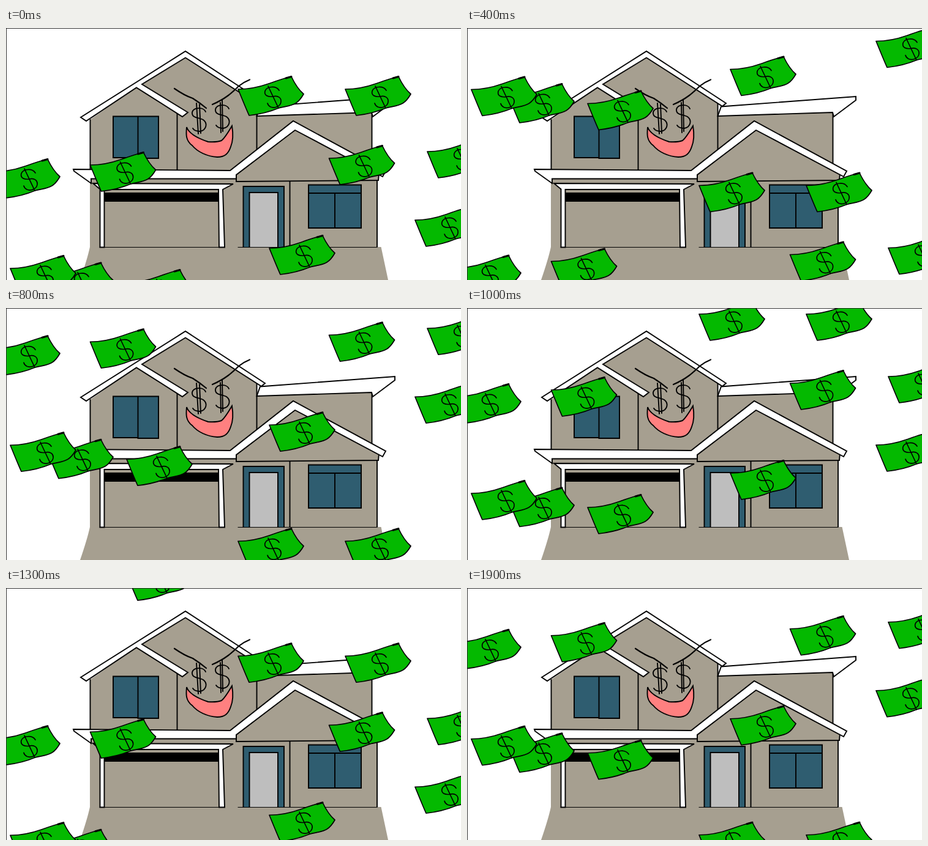
Write an HTML page that moves like this. It is 743x412 px and loops after 2000 ms.

```html
<!DOCTYPE html>
<html lang="en">
<head>
<meta charset="utf-8">
<title>Money house</title>
<style>
  html, body { margin: 0; width: 100%; height: 100%; overflow: hidden; background: #fff; }
  svg { display: block; width: 743px; height: 412px; }
  .line { fill: none; }
  .wall { fill: #a69f90; }
  .roof { fill: #fff; }
  .glass { fill: #2f5d70; }
</style>
</head>
<body>
<svg viewBox="0 0 743 412" stroke="#000" stroke-width="1.9" stroke-linecap="round">
  <defs>
    <g id="bill" stroke-width="1.7" stroke-linejoin="round">
      <path fill="#04b900" d="M0 22C20 22 36 18 50 13C64 8 75 4 87 1.500C92 12 99 23 107 30C103 37 99 42 94 45C86 50 76 50 66 53C52 59 36 63 18 65C13 54 7 39 0 22Z"/>
      <path class="line" stroke-width="3" d="M78 4L87 1.500"/>
      <path class="line" d="M67 24C62 16 47 17 44 25C42 33 50 35 57 34C65 32 71 36 70 43C69 50 60 54 53 51Q49 49 48 45M49 17L66 53"/>
    </g>
  </defs>

  <!-- walls -->
  <g class="wall" stroke="none">
    <path d="M137 358H612.500L624 412H121Q133 377 137 358Z"/>
    <path d="M137 246H606V359H137Z"/>
    <path d="M137 150L213 97L293 46L409 124V246H137Z"/>
    <path d="M409 144L597 138V246H409Z"/>
  </g>
  <path class="line" d="M137.500 150V232M279.500 140V232M409.500 124V198M597.500 138V226M463.500 251V358M606 249V358"/>
  <path class="line" stroke-width="1.2" d="M153 358.500H356M379 358.500H605"/>

  <!-- roofs -->
  <path class="roof" d="M409.500 144L415 128.500L635 112V118L599 145L597 138Z"/>
  <path class="roof" d="M122 146L293 38L423 123L417 128L293 48.500L222 92L297 138L288 145L213 97.500L131 152Z"/>
  <path class="wall" d="M376 240L472 166L609 238L608 249L376 251Z"/>
  <path class="roof" d="M110 231L366 233L469 152L620 234L615 243L472 167L376 240V246.500H139V254L111 234Z"/>

  <!-- garage -->
  <path fill="#000" d="M160 270H348V283H160Z"/>
  <path class="roof" d="M142 254L371 255L354 264L357 358.500H348L347 264H160.500V358.500H153.500V263.500Z"/>

  <!-- door and windows -->
  <path class="glass" d="M387.500 358V259H454V358"/>
  <path fill="#bebebe" d="M397.500 358V269H444V358"/>
  <path class="glass" d="M175 144.500H249V213H215.500V212H175ZM215.500 145V213"/>
  <path class="glass" d="M494 256.500H580V327H494ZM494 270H580M537 270V327"/>

  <!-- face -->
  <path fill="#ff8080" d="M295 162C299 174 315 181 330 186Q344 187 352 184C358 179 363 170 369 160C371 172 371 184 367 194C363 206 357 211 345 211C329 210 313 203 304 192C293 184 294 173 295 162Z"/>
  <g class="line">
    <path stroke-width="2.2" d="M275 99C288 108 299 113 305 115Q316 122 327 131M337 125C358 116 369 106 380 95Q389 88 398 84.500"/>
    <path id="eye" d="M326 137C323 129 306 129 304 138C303 148 316 146 322 150C330 156 327 167 317 169Q308 169 305 164"/>
    <use href="#eye" x="38" y="-5"/>
    <path d="M311 123L314 173M316 125L318 172M350 122L351 171M353 117L354 169"/>
  </g>

  <g id="bills"></g>
  <path class="line" stroke="#333" stroke-width="1" stroke-linecap="butt" d="M0 .5H743M.5 0V412"/>
</svg>
<script>
const FRAME_MS = 100;
const UNIT = 11.25;      // pixels fallen per unit
const SPAN = 450;        // fall distance before a bill reappears above
const TOP = -50;

// Units fallen in each frame; the rhythm is uneven and skips ahead near the end.
const steps = [0, 3, 4, 3, 4, 3, 3, 2, 3, 3, 4, 3, 3, 3, 3, 3, 3, 3, 12, 2];

// Left edge and starting height of each bill, back to front.
const starts = [
  [-19, 213], [68, 382.5], [7, 371], [197, 394], [137.5, 202], [379, 78],
  [430, 338], [527.5, 191], [554, 78], [668, 292], [688, 180]
];

let total = 0;
const fallen = steps.map(step => (total += step) * UNIT);

const layer = document.getElementById("bills");
const bills = starts.map(([x, y]) => {
  const node = document.createElementNS(layer.namespaceURI, "use");
  node.setAttribute("href", "#bill");
  node.setAttribute("x", x);
  layer.append(node);
  return { node, y };
});

function draw() {
  const frame = Math.floor(performance.now() / FRAME_MS) % steps.length;
  for (const { node, y } of bills) {
    node.setAttribute("y", (y + fallen[frame] - TOP) % SPAN + TOP);
  }
  requestAnimationFrame(draw);
}
draw();
</script>
</body>
</html>
```
